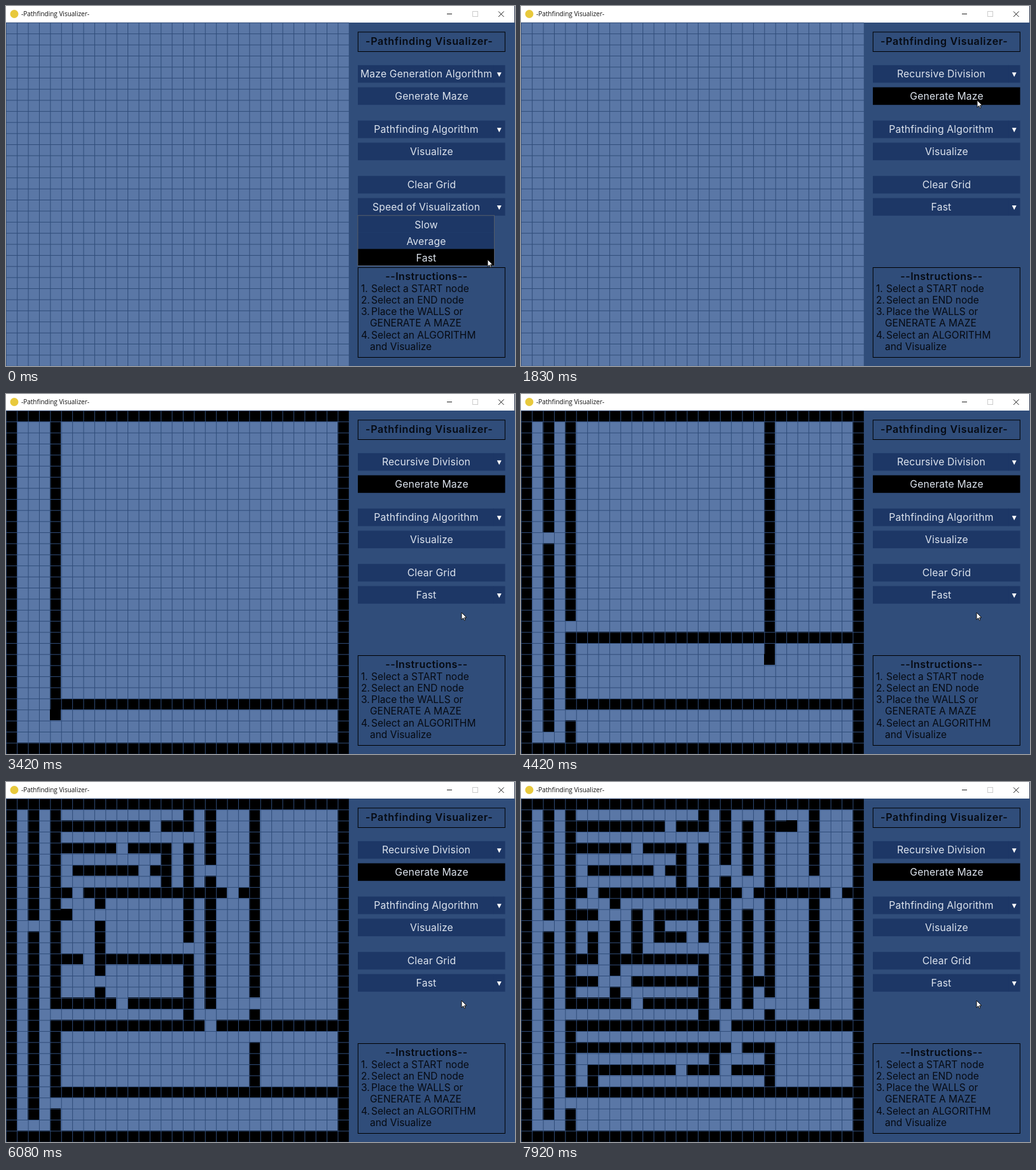
Write an HTML page with a canvas that moves like this. It is 800 px wide and 565 px high and loops after 8000 ms.

```html
<!DOCTYPE html>
<html lang="en">
<head>
<meta charset="utf-8">
<title>Pathfinding Visualizer</title>
<style>
  html, body { margin: 0; width: 100%; height: 100%; overflow: hidden; }
  canvas { display: block; }
</style>
</head>
<body>
<canvas id="stage" width="800" height="565"></canvas>
<script>
const ctx = document.getElementById('stage').getContext('2d');
const LOOP = 8000, FRAME = 250 / 3;
const SIZE = 31, CELL = 539 / SIZE, TOP = 26;
const PANEL = '#304d7a', BUTTON = '#1d3766', FLOOR = '#5a77a6', LABEL = '#dde4ee', INK = '#060a12';

// ---- Maze: a list of steps, each filling or clearing a few cells ----
const steps = [], knots = [[1990, 0]];
const step = (wall, ...cells) => steps.push({ wall, cells });
const mark = (ms, ahead) => knots.push([ms, steps.length + ahead]);

class Region {
  constructor(c0, r0, c1, r1) { Object.assign(this, { c0, r0, c1, r1 }); }
  fillRow(r) { for (let c = this.c0; c <= this.c1; c++) step(true, [c, r]); }
  fillCol(c) { for (let r = this.r0; r <= this.r1; r++) step(true, [c, r]); }
  row(r, ...gaps) {
    const { c0, r0, c1, r1 } = this;
    this.fillRow(r);
    gaps.forEach(c => step(false, [c, r]));
    return [new Region(c0, r0, c1, r - 1), new Region(c0, r + 1, c1, r1)];
  }
  col(c, ...gaps) {
    const { c0, r0, c1, r1 } = this;
    this.fillCol(c);
    gaps.forEach(r => step(false, [c, r]));
    return [new Region(c0, r0, c - 1, r1), new Region(c + 1, r0, c1, r1)];
  }
  // Both walls are built before any gap opens; returns the four quarters.
  cross(r, rowGaps, c, colGaps) {
    const { c0, r0, c1, r1 } = this;
    this.fillRow(r);
    this.fillCol(c);
    rowGaps.forEach(x => step(false, [x, r]));
    colGaps.forEach(y => step(false, [c, y]));
    return [new Region(c0, r0, c - 1, r - 1), new Region(c + 1, r0, c1, r - 1),
            new Region(c0, r + 1, c - 1, r1), new Region(c + 1, r + 1, c1, r1)];
  }
}

function buildMaze() {
  const last = SIZE - 1;
  for (let i = 0; i < SIZE; i++) step(true, [i, 0], [i, last]);
  for (let i = 0; i < SIZE; i++) step(true, [0, i], [last, i]);

  const [upper] = new Region(5, 1, 29, 29).row(26);
  mark(3420, 27);
  const [strip] = new Region(1, 1, 29, 29).col(4, 19, 27);
  strip.col(2, 11, 29);
  mark(4420, 47);
  const [main, east, south] = upper.cross(20, [18], 22, [18, 21]);
  const [north, northEast, middle, middleEast] = main.cross(8, [6, 20], 18, [6, 19]);

  const [hall] = north.col(16, 3);
  const [, lowerHall] = hall.row(2, 13);
  const [room] = lowerHall.col(14, 3);
  const [, den] = room.row(4, 10);
  den.row(6, 5, 12);

  const [block] = middle.col(16, 13);
  const [core] = block.row(18, 10);
  const [coreA, coreB, coreC, coreD] = core.cross(14, [7], 8, [10, 16]);
  mark(6080, 1);
  coreA.row(10, 7)[1].col(6, 11);
  coreB.col(10, 9)[1].row(10, 11)[1].col(12, 13)[1].row(12, 15);
  coreC.row(16, 7);
  coreD.row(16, 9);

  mark(6730, 1);
  northEast.col(20, 1, 7);
  middleEast.col(20, 9, 19)[1].row(16);
  const [southWest, southEast] = south.row(22, 19)[1].col(17, 25);
  const [, cellar] = southWest.col(6, 23);
  mark(7500, 3);
  cellar.row(24, 14);
  southEast.row(24, 18);
  const [corner] = east.cross(8, [28], 26, [7, 19]);
  mark(7920, 2);
  corner.row(2);
}
buildMaze();

// ---- Timing ----
function along(keys, t) {
  if (t <= keys[0][0]) return keys[0].slice(1);
  const i = keys.findIndex(k => k[0] > t);
  if (i < 0) return keys[keys.length - 1].slice(1);
  const a = keys[i - 1], b = keys[i], u = (t - a[0]) / (b[0] - a[0]);
  return a.slice(1).map((v, j) => v + (b[j + 1] - v) * u);
}

const pointerPath = [
  [170, 757, 398], [330, 762, 385], [830, 777, 106], [920, 777, 103], [1080, 777, 103],
  [1500, 735, 158], [1600, 722, 160], [1830, 717, 148], [2250, 717, 148], [2900, 716, 343]
];
const PICK_SPEED = 300, OPEN_MAZE = 1060, PICK_MAZE = 1600, GENERATE = 1750;

// ---- Drawing helpers ----
function rect(color, x, y, w, h) {
  ctx.fillStyle = color;
  ctx.fillRect(x, y, w, h);
}
function frame(color, x, y, w, h) {
  ctx.strokeStyle = color;
  ctx.lineWidth = 1;
  ctx.strokeRect(x + .5, y + .5, w - 1, h - 1);
}
function text(str, x, y, { color = LABEL, align = 'center', font = '15.7px Inter, sans-serif', spacing = .18 } = {}) {
  ctx.fillStyle = color;
  ctx.textAlign = align;
  ctx.font = font;
  ctx.letterSpacing = spacing + 'px';
  ctx.fillText(str, x, y);
}
function polygon(points, fill, stroke) {
  ctx.beginPath();
  points.forEach(([x, y]) => ctx.lineTo(x, y));
  ctx.closePath();
  ctx.fillStyle = fill;
  ctx.fill();
  if (stroke) { ctx.strokeStyle = stroke; ctx.lineWidth = 1; ctx.stroke(); }
}

function drawTitleBar() {
  rect('#fff', 0, 0, 799, TOP);
  rect('#26324a', 799, 0, 1, TOP);
  ctx.beginPath();
  ctx.arc(13, 12.5, 6.5, 0, 7);
  ctx.fillStyle = '#e8c93c';
  ctx.fill();
  text('-Pathfinding Visualizer-', 24, 16.3, { color: '#111', align: 'left', font: '10px "Open Sans", sans-serif', spacing: 0 });
  rect('#222', 693, 12, 8, 1);
  frame('#ccc', 733, 8, 9, 9);
  ctx.strokeStyle = '#222';
  ctx.beginPath();
  ctx.moveTo(774, 8.5); ctx.lineTo(782.5, 17);
  ctx.moveTo(782.5, 8.5); ctx.lineTo(774, 17);
  ctx.stroke();
}

function drawGrid(t) {
  const edge = i => Math.floor(i * CELL);
  const fillCell = (color, c, r) =>
    rect(color, edge(c), TOP + edge(r), edge(c + 1) - edge(c), edge(r + 1) - edge(r));
  const count = t < knots[0][0] ? 0 : Math.floor(along(knots, t)[0] + 1e-6);

  rect(FLOOR, 0, TOP, 539, 539);
  const done = steps.slice(0, count);
  for (const { wall, cells } of done)
    for (const [c, r] of cells) fillCell(wall ? '#000' : FLOOR, c, r);
  for (let i = 0; i <= SIZE; i++) {
    rect(PANEL, i * CELL - .2, TOP, 1, 539);
    rect(PANEL, 0, TOP + i * CELL - .2, 539, 1);
  }
  // The newest cell sits above the grid lines.
  const newest = done[count - 1];
  if (newest && newest.wall) newest.cells.forEach(([c, r]) => fillCell('#000', c, r));
}

function drawPanel(t, px, py) {
  const speedOpen = t < PICK_SPEED, mazeOpen = t >= OPEN_MAZE && t < PICK_MAZE;
  const inside = (x, y, w, h) => px >= x && px < x + w && py >= y && py < y + h;
  const hover = (...box) => !speedOpen && !mazeOpen && t < GENERATE && inside(...box);

  const HEIGHT = 27.6;
  const slotTop = slot => 92.8 + slot * 2 * CELL;
  const button = (label, slot, held) => {
    const y = slotTop(slot);
    rect(held || hover(553, y, 231, HEIGHT) ? '#000' : BUTTON, 553, y, 231.5, HEIGHT);
    text(label, 669, y + 19.2);
  };
  const dropdown = (label, slot) => {
    const y = slotTop(slot);
    rect(hover(553, y, 213, HEIGHT) ? '#000' : BUTTON, 553, y, 214, HEIGHT);
    rect(hover(766, y, 18, HEIGHT) ? '#000' : BUTTON, 766.5, y, 18, HEIGHT);
    text(label, 660.5, y + 19.2);
    polygon([[771.7, y + 11.5], [778.7, y + 11.5], [775.2, y + 18.5]], '#fff');
  };
  const menu = (items, slot) => {
    const y = slotTop(slot) + HEIGHT - .8;
    items.forEach((label, i) => {
      const top = y + 1 + i * 26;
      rect(inside(553, top, 214, 26) ? '#000' : BUTTON, 553, top, 214, 26);
      text(label, 660.5, top + 19.3);
    });
    frame('#555c68', 552.4, y, 215.6, items.length * 26 + 2);
  };

  rect(PANEL, 539, TOP, 261, 539);
  const heading = { color: INK, font: '600 16px Inter, sans-serif' };
  frame('#000', 552.8, 40.4, 232, 31.6);
  text('-Pathfinding Visualizer-', 665.2, 61, { ...heading, spacing: .68 });

  dropdown(t < PICK_MAZE ? 'Maze Generation Algorithm' : 'Recursive Division', 0);
  button('Generate Maze', 1, t >= GENERATE);
  dropdown('Pathfinding Algorithm', 2.5);
  button('Visualize', 3.5);
  button('Clear Grid', 5);
  dropdown(speedOpen ? 'Speed of Visualization' : 'Fast', 6);

  frame('#000', 552.8, 410, 232, 142);
  text('--Instructions--', 661, 430.2, { ...heading, spacing: .45 });
  const line = (str, x, i) =>
    text(str, x, 448.7 + i * 18.25, { color: INK, align: 'left', font: '15.5px Inter, sans-serif', spacing: 0 });
  ['Select a START node', 'Select an END node', 'Place the WALLS or', 'Select an ALGORITHM'].forEach((str, i) => {
    const slot = i < 3 ? i : 4;
    line(`${i + 1}.`, 558, slot);
    line(str, 574, slot);
  });
  line('GENERATE A MAZE', 572, 3);
  line('and Visualize', 572, 5);

  if (speedOpen) menu(['Slow', 'Average', 'Fast'], 6);
  if (mazeOpen) menu(['Random Maze', 'Recursive Division'], 0);
}

function drawPointer(x, y) {
  const shape = [[0, 0], [0, 17], [4, 13], [7, 19], [9, 18], [7, 12], [12, 12]];
  polygon(shape.map(([a, b]) => [x + a * .66, y + b * .66]), '#fff', '#111');
}

function render(now) {
  const n = Math.floor((now % LOOP + 3.4) / FRAME) % 96;
  const t = Math.round(n * FRAME / 10) * 10;
  const [px, py] = along(pointerPath, t);
  drawTitleBar();
  drawGrid(t);
  drawPanel(t, px, py);
  drawPointer(px, py);
}

const start = performance.now();
(function tick() {
  render(performance.now() - start);
  requestAnimationFrame(tick);
})();
</script>
</body>
</html>
```
